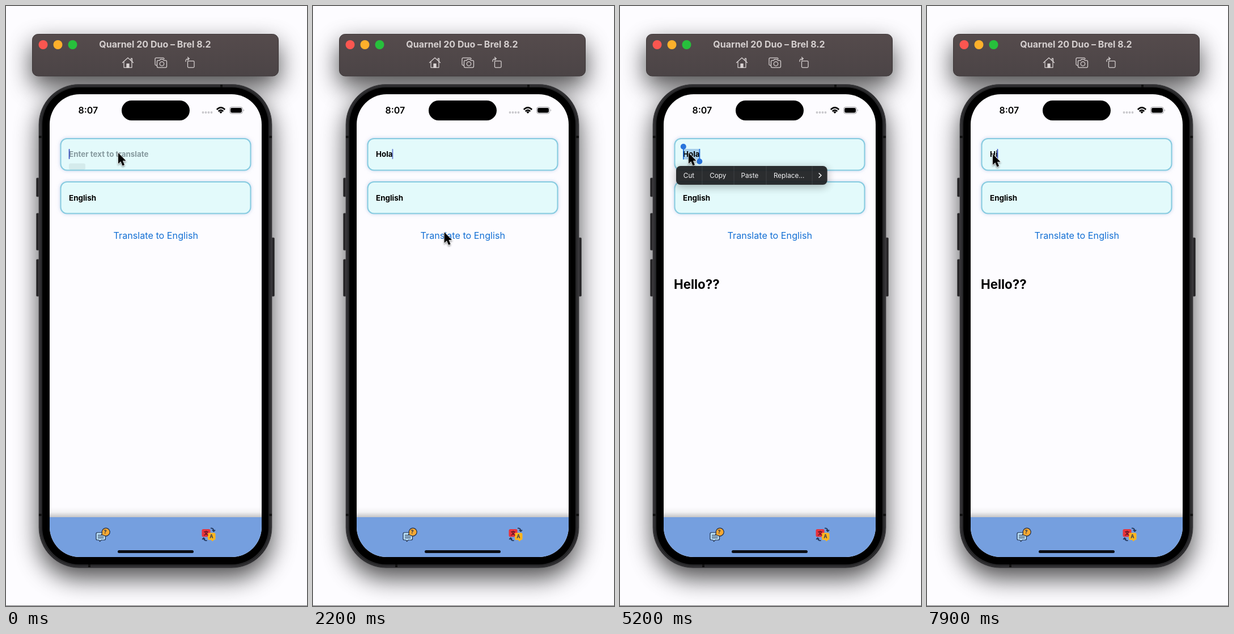
An HTML page that plays this animation: 531x1054 px, repeating every 8000 ms.

```html
<!DOCTYPE html>
<html lang="en">
<head>
<meta charset="utf-8">
<style>
  html, body { margin: 0; width: 100%; height: 100%; overflow: hidden; background: #fdfcff; }
  svg { display: block; width: 100%; height: 100%; font-family: Inter, Roboto, sans-serif; }
  .shadow { filter: blur(22px); opacity: .7; }
  .field { fill: #e3fafb; stroke: #86cbe0; stroke-width: 2; filter: drop-shadow(0 0 3px #9ab4dc88); }
  .input { font-size: 13.4px; font-weight: 700; }
  .line { fill: none; stroke: #d9d3d3; stroke-width: 1.25; stroke-linejoin: round; stroke-linecap: round; }
  .menu { filter: drop-shadow(0 4px 9px #0005); }
  .pointer { filter: drop-shadow(0 2px 1.5px #0006); }
</style>
</head>
<body>
<svg viewBox="0 0 531 1054">
  <defs>
    <linearGradient id="barFill" x2="0" y2="1">
      <stop stop-color="#554b4c"/><stop offset="1" stop-color="#4b4446"/>
    </linearGradient>
    <linearGradient id="tabShade" x2="0" y2="1">
      <stop stop-color="#777" stop-opacity="0"/>
      <stop offset=".5" stop-color="#777" stop-opacity=".08"/>
      <stop offset="1" stop-color="#777" stop-opacity=".42"/>
    </linearGradient>
    <clipPath id="screen"><rect x="77" y="155" width="374" height="813" rx="53"/></clipPath>
  </defs>

  <rect width="531" height="1054" fill="#fdfcff"/>
  <rect class="shadow" x="46" y="67" width="435" height="74" rx="10"/>
  <rect class="shadow" x="58" y="155" width="411" height="850" rx="70"/>
  <path d="M0 1053.5H531" stroke="#77757a"/>

  <!-- window toolbar -->
  <rect x="46.5" y="49.5" width="434" height="73.5" rx="10" fill="url(#barFill)" stroke="#3b3536"/>
  <circle cx="65.5" cy="68" r="8" fill="#fb5650"/>
  <circle cx="91.5" cy="68" r="8" fill="#fdb02b"/>
  <circle cx="117.5" cy="68" r="8" fill="#27c03c"/>
  <text x="263" y="73" text-anchor="middle" font-size="16" font-weight="700" fill="#d5cfcf">Quarnel 20 Duo – Brel 8.2</text>
  <g class="line">
    <path d="M205.5 99.5L215 91L224.5 99.5M208 98V108H222V98M220.5 95V92H222.5V97.5"/>
    <path d="M213 108V101.5H217V108Z" fill="#d9d3d3"/>
    <path d="M266 104H264.500Q263 104 263 102.500V93Q263 91 265 91H277Q279 91 279 93"/>
    <path d="M268.500 95.500H271L272.500 93.500H277L278.500 95.500H281.500Q283.500 95.500 283.500 97.500V106Q283.500 108 281.500 108H268.500Q266.500 108 266.500 106V97.500Q266.500 95.500 268.500 95.500Z"/>
    <circle cx="275" cy="101.500" r="3.700"/>
    <rect x="320.500" y="96.500" width="11.500" height="11.500" rx="1.500"/>
    <path d="M317 97.500Q316.500 92.500 323 92.500M320.500 90L323.300 92.500L320.500 95"/>
  </g>

  <!-- phone body -->
  <g fill="#252426" stroke="#4b4a4d" stroke-width=".7">
    <rect x="53.500" y="302" width="6" height="33" rx="1.500"/>
    <rect x="53.500" y="364" width="6" height="65" rx="1.500"/>
    <rect x="53.500" y="445" width="6" height="65" rx="1.500"/>
    <rect x="467.500" y="407" width="6" height="103" rx="1.500"/>
  </g>
  <rect x="58" y="137.500" width="411" height="849.500" rx="71" fill="#262628" stroke="#565558"/>
  <rect x="60.500" y="140" width="406" height="844.500" rx="68" fill="none" stroke="#3c3b3e"/>
  <path d="M58 230H63M464 230H469M380 138V143M147 981V986M58 894H63M464 894H469" stroke="#111" stroke-width="4"/>
  <rect x="64" y="143" width="399" height="838" rx="65"/>
  <rect x="77" y="155" width="374" height="813" rx="53" fill="#fdfcff"/>

  <!-- status bar -->
  <text x="127.500" y="189" font-size="16" font-weight="600">8:07</text>
  <rect x="204" y="166" width="120" height="35" rx="17.500"/>
  <path d="M347.500 187H363" stroke="#c9c8cc" stroke-width="3.800" stroke-linecap="round" stroke-dasharray="0 5"/>
  <g fill="none" stroke="#000" stroke-width="2.500">
    <path d="M371.800 182Q379 174.800 386.200 182M374.700 185Q379 180.800 383.300 185"/>
  </g>
  <path d="M376.400 186.200Q379 184 381.600 186.200L379 189Z"/>
  <rect x="394.500" y="177.500" width="23" height="11.500" rx="3.700" fill="none" stroke="#99989c"/>
  <rect x="396" y="179" width="20" height="8.500" rx="2.400"/>
  <path d="M419 181.500Q421 183.200 419 185Z" fill="#99989c"/>

  <!-- form -->
  <rect class="field" x="96.500" y="233" width="335" height="55.500" rx="11"/>
  <rect class="field" x="96.500" y="309" width="335" height="55.500" rx="11"/>
  <rect id="smudge" x="111" y="276.500" width="29" height="11" rx="3" fill="#0b2b2b" opacity=".07"/>
  <rect id="highlight" x="111" y="251" width="30" height="18.500" fill="#a5cdea"/>
  <text id="entry" class="input" x="111" y="265"></text>
  <rect id="caret" y="251" width="1.800" height="18" rx=".9" fill="#3f55c4"/>
  <text class="input" x="111" y="341.500">English</text>
  <text id="button" x="264.300" y="408.500" text-anchor="middle" font-size="16.200" fill="#1470d4">Translate to English</text>
  <g id="spinner" transform="translate(262.500 400)" stroke="#2f8cf0" stroke-width="5" stroke-linecap="round"></g>
  <text id="answer" x="95" y="497" font-size="22.300" font-weight="700">Hello??</text>

  <!-- tab bar -->
  <g clip-path="url(#screen)">
    <rect x="77" y="880" width="374" height="18" fill="url(#tabShade)"/>
    <rect x="77" y="898" width="374" height="70" fill="#759fdf"/>
  </g>
  <rect x="197" y="956" width="134" height="5" rx="2.500" fill="#0b0e14"/>
  <g stroke="#22304a" stroke-width="1.200" stroke-linejoin="round">
    <path d="M161 925H173Q175.500 925 175.500 927.500V936Q175.500 938 173 938H168L165.500 940.500L164 938H161Q159 938 159 936V927.500Q159 925 161 925Z" fill="#b9e0fa"/>
    <path d="M162 929.500H171M162 932H172.500M162 934.500H172.500"/>
    <path d="M168.500 928.500L169.500 926A7 7 0 1 1 172.500 930Z" fill="#f6a833"/>
  </g>
  <text x="175" y="927" text-anchor="middle" font-size="9" font-weight="700" fill="#22304a">?</text>
  <rect x="345.500" y="919" width="15" height="13.500" rx="2.500" fill="#e8333c"/>
  <path d="M358 925.500H367Q369.500 925.500 369.500 928V936Q369.500 938 367 938L364 940.500L362 938H358Q356 938 356 935.500V928Q356 925.500 358 925.500Z" fill="#fdb51e"/>
  <text x="353" y="929" text-anchor="middle" font-size="8.500" font-weight="700" fill="#4b1320" font-family="Noto Sans CJK SC, Noto Sans CJK JP, sans-serif">文</text>
  <text x="362.500" y="935" text-anchor="middle" font-size="8.500" font-weight="700" fill="#333b52">A</text>
  <g fill="none" stroke="#24395f" stroke-width="1.800">
    <path d="M361 917.500Q366 917 366.500 922M364 920.500L366.500 923L369 920.500M354.500 939Q349 939.500 348.700 935M346.200 937L348.700 934.500L351.200 937"/>
  </g>

  <!-- text selection -->
  <g id="handles" fill="#1162d8">
    <rect x="111" y="249" width="1.800" height="20.500"/>
    <rect x="139.500" y="251" width="1.800" height="20.500"/>
    <circle cx="111.800" cy="247" r="5"/>
    <circle cx="140.300" cy="273" r="5"/>
  </g>
  <g id="menu" class="menu" font-size="13.700" fill="#f4f4f6">
    <rect x="95" y="282" width="311" height="38.500" rx="9" fill="#1e2022"/>
    <path d="M148.500 282V320.500M214 282V320.500M280.500 282V320.500M375 282V320.500" stroke="#393b3e"/>
    <text x="110" y="306">Cut</text>
    <text x="164" y="306">Copy</text>
    <text x="228.500" y="306">Paste</text>
    <text x="295.500" y="306">Replace…</text>
    <path d="M388.500 296.500L393.500 301.300L388.500 306" fill="none" stroke="#f4f4f6" stroke-width="1.800"/>
  </g>
  <path id="pointer" class="pointer" d="M0 0V19L4.400 15L7.600 22.500L11 21L7.900 13.800H13.500Z" stroke="#fff" stroke-width="1.300" paint-order="stroke"/>
</svg>

<script>
const LOOP = 8000, LOAD = 2500, LOADED = 3600, SELECT = 4900, RETYPE = 7400;
const el = id => document.getElementById(id);
const clamp = v => Math.max(0, Math.min(1, v));
const smooth = v => { v = clamp(v); return v * v * (3 - 2 * v); };
const show = (id, opacity) => el(id).setAttribute('opacity', +opacity);

// time, x, y
const pointerPath = [
  [0, 198, 258], [1500, 198, 258], [2250, 232, 399], [3650, 232, 399],
  [4200, 198, 290], [4750, 121, 258], [5400, 121, 258], [6000, 116, 260], [8000, 116, 260]
];

const spokes = Array.from({ length: 8 }, (_, i) => {
  const spoke = document.createElementNS('http://www.w3.org/2000/svg', 'path');
  spoke.setAttribute('d', 'M0 -8.500V-14.500');
  spoke.setAttribute('transform', `rotate(${i * 45})`);
  return el('spinner').appendChild(spoke);
});

function pointerAt(t) {
  const i = pointerPath.findIndex(key => key[0] > t);
  const [t0, x0, y0] = pointerPath[i - 1], [t1, x1, y1] = pointerPath[i];
  const k = smooth((t - t0) / (t1 - t0));
  return [x0 + (x1 - x0) * k, y0 + (y1 - y0) * k];
}

function typedAt(t) {
  if (t >= RETYPE) return 'Hi'.slice(0, 1 + Math.floor((t - RETYPE) / 200));
  return 'Hola'.slice(0, Math.max(0, Math.floor((t - 200) / 200)));
}

function caretOpacity(t) {
  if (t >= LOAD && t < LOADED || t >= SELECT && t < RETYPE) return 0;
  if (t < 1400 || t >= RETYPE) return 1;
  const phase = (t + 300) % 1000;
  return phase < 700 ? clamp(1 - (phase - 450) / 200) : clamp((phase - 850) / 150);
}

function draw(t) {
  const typed = typedAt(t), entry = el('entry');
  entry.textContent = typed || 'Enter text to translate';
  entry.setAttribute('fill', typed ? '#000' : '#869a9f');
  el('caret').setAttribute('x', typed ? 110.7 + entry.getComputedTextLength() - .8 : 110.7);
  show('caret', caretOpacity(t));
  show('smudge', .07 * clamp(1 - t / 200));

  const loading = t >= LOAD && t < LOADED;
  show('button', !loading);
  show('spinner', loading);
  show('answer', t >= LOADED);
  const head = Math.floor(t / 100) + 3;
  spokes.forEach((spoke, i) => {
    const age = (head - i + 800) % 8;
    spoke.setAttribute('opacity', Math.max(.32, 1 - age * .16));
  });

  const selected = t >= SELECT && t < RETYPE;
  show('highlight', selected);
  show('handles', selected && clamp((t - SELECT) / 340));
  const grow = selected ? clamp((t - 5050) / 250) : 0;
  const scale = .64 + .36 * grow;
  show('menu', clamp(grow * 1.55));
  el('menu').setAttribute('transform', `translate(123 275) scale(${scale}) translate(-123 -275)`);

  el('pointer').setAttribute('transform', `translate(${pointerAt(t)})`);
}

const start = performance.now();
function frame() {
  draw((performance.now() - start) % LOOP);
  requestAnimationFrame(frame);
}
frame();
</script>
</body>
</html>
```
